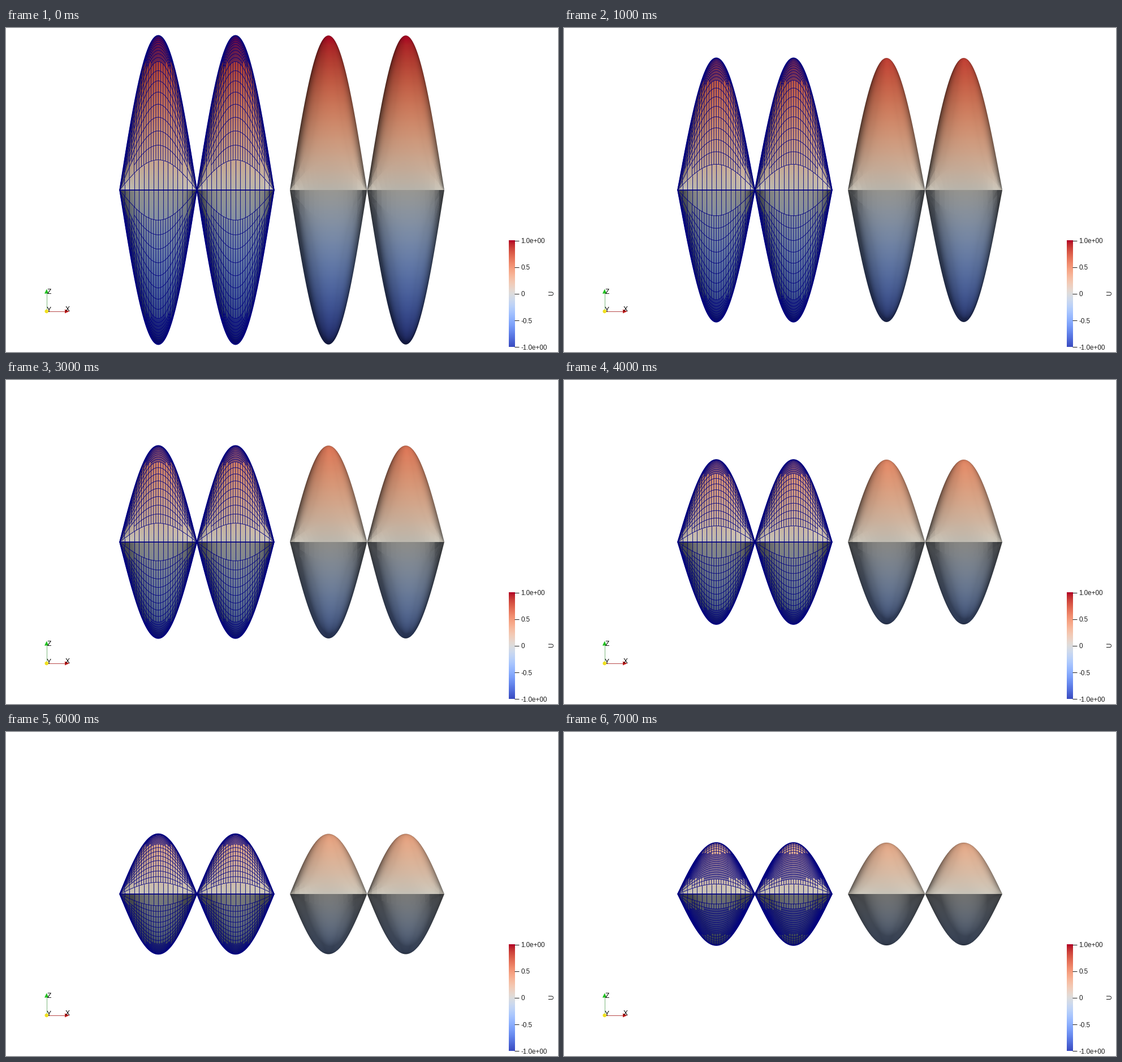
Recreate the animation shown at these times as a matplotlib script. Size 976 px wide and 574 px high, loop 8000 ms.

```python
import numpy as np
import matplotlib.pyplot as plt
from matplotlib.animation import FuncAnimation
from matplotlib.collections import LineCollection
from matplotlib.patches import Circle, Polygon

W, H, DPI = 976, 574, 64
PX = 72 / DPI                    # points per pixel
MID, AMP, DECAY = 287.0, 273.7, 0.8545
LOBE = 136.5
LEFT, RIGHT = 201.0, 502.0
COARSE = 0.15                    # below this relative height the mesh stays coarse
NAVY = (0, 0, 0.5)
INK = "#1c1c1c"
CMAP = plt.get_cmap("coolwarm")

fig = plt.figure(figsize=(W / DPI, H / DPI), dpi=DPI, facecolor="white")
ax = fig.add_axes([0, 0, 1, 1])
ax.axis("off")


def direction(elevation, azimuth):
    e, a = np.radians([elevation, azimuth])
    return np.array([np.cos(e) * np.sin(a), np.cos(e) * np.cos(a), np.sin(e)])


# (direction as x / toward camera / up, intensity, colour)
LIGHTS = [
    (direction(50, 10), 0.75, (1, 0.972, 0.902)),
    (direction(-75, 0), 0.18, (0.909, 0.955, 1)),
    (direction(0, 0), 0.25, (1, 1, 1)),
    (direction(0, 110), 0.21, (1, 1, 1)),
    (direction(0, -110), 0.21, (1, 1, 1)),
]

px, py = np.meshgrid(np.arange(W) + 0.5, np.arange(H) + 0.5)
across = np.where(px < 488, px - LEFT, px - RIGHT) / LOBE
inside = (across >= 0) & (across <= 2)
across = across % 1
height = MID - py
side = np.where(height >= 0, 1.0, -1.0)


def light(u, s, amp):
    """Light on the front face at phase u and relative height s."""
    k = amp * np.pi / LOBE
    n = np.stack([-k * np.cos(np.pi * u) * s,
                  k * np.sin(np.pi * u) * np.sqrt(1 - s ** 2),
                  side], axis=-1)
    n /= np.linalg.norm(n, axis=-1, keepdims=True)
    total = np.zeros(n.shape)
    for d, power, tint in LIGHTS:
        total += np.clip(n @ d, 0, None)[..., None] * power * np.array(tint)
    return np.clip(total, 0, 1)


def facets(u, s):
    """Snap points in coarse cells to the centre of their triangle."""
    a, b = u * 16, np.arcsin(s) / np.pi * 16
    i, j = np.floor(a), np.floor(b)
    third = np.where(a - i + b - j > 1, 2 / 3, 1 / 3)
    rel = np.sin(np.pi * (i + 0.5) / 16) * np.sin(np.pi * (j + 0.5) / 16)
    v = np.minimum((j + third) / 16, 0.5)
    return rel < COARSE, (i + third) / 16, np.sin(np.pi * v)


def surface(amp, faceted):
    top = np.maximum(amp * np.sin(np.pi * across), 1e-6)
    s = np.clip(np.abs(height) / top, 0, 1)
    shade = light(across, s, amp)
    if faceted:
        coarse, u2, s2 = facets(across, s)
        flat = 0.45 * shade + 0.55 * light(u2, s2, amp)
        shade = np.where(coarse[..., None], flat, shade)
    rgb = CMAP((height / AMP + 1) / 2)[..., :3] * shade
    slope = amp * np.pi / LOBE * np.cos(np.pi * across)
    cover = np.clip((top - np.abs(height)) / np.hypot(1, slope) + 0.5, 0, 1)
    cover = (cover * inside)[..., None]
    return rgb * cover + (1 - cover)


def mesh(late):
    """Lower and left edges of an adaptively split grid, in units of pi."""
    edges = []

    def split(i, j, n):
        rel = np.sin(np.pi * (i + 0.5) / n) * np.sin(np.pi * (j + 0.5) / n)
        if n == 16:
            fine = rel > COARSE
        else:
            fine = n == 32 and (0.3 < rel < 0.79 if late else rel > 0.815)
        if fine:
            for di in (0, 1):
                for dj in (0, 1):
                    split(2 * i + di, 2 * j + dj, 2 * n)
        else:
            edges.append([(i + 1, j), (i, j), (i, j + 1)])
            edges[-1] = np.array(edges[-1]) / n

    for i in range(16):
        for j in range(8):
            split(i, j, 16)
    return np.array(edges)


MESHES = [mesh(False), mesh(True)]


def wires(grid, amp):
    u, v = grid[..., 0], grid[..., 1]
    z = amp * np.sin(np.pi * u) * np.sin(np.pi * v)
    return np.concatenate([np.stack([LEFT + (n + u) * LOBE, MID - g * z], axis=-1)
                           for n in (0, 1) for g in (1, -1)])


def rims(amp):
    u = np.linspace(0, 2, 241)
    z = amp * np.abs(np.sin(np.pi * u))
    return [np.column_stack([LEFT + u * LOBE, MID - g * z]) for g in (1, -1, 0)]


def label(x, y, text, size=11.6, color=INK, **kw):
    ax.text(x, y, text, fontsize=size * PX, family="Liberation Sans",
            color=color, va="center_baseline", **kw)


def line(xs, ys, color, width=1):
    ax.plot(xs, ys, color=color, lw=width * PX, solid_capstyle="butt", zorder=4)


def color_bar():
    ramp = np.linspace(1, 0, 189)[:, None]
    ax.imshow(CMAP(ramp), extent=(889, 900, 565.5, 376.5), aspect="auto",
              interpolation="nearest", zorder=3)
    names = ["1.0e+00", "0.5", "0", "-0.5", "-1.0e+00"]
    for n, name in enumerate(names):
        y = 376.5 + 47.2 * n
        line([898.5, 907], [y, y], INK)
        label(910.5, y, name)
    label(965, 470, "U", rotation=90, ha="center")


def axes_marker():
    line([72, 72], [502, 470], "#7fb87f")
    line([72, 105], [502, 502], "#b84a4a")
    green = [(68, 470.5), (75.5, 470.5), (71.8, 462.5)]
    red = [(104, 498.5), (104, 505.5), (112, 502)]
    for pts, color in ((green, "#22c022"), (red, "#c01c1c")):
        ax.add_patch(Polygon(pts, fc=color, ec="none", zorder=5))
    ax.add_patch(Circle((71.8, 502), 3.3, fc="#f0e020", ec="none", zorder=6))
    for x, y, name in ((76.5, 466.5, "Z"), (76, 498.5, "Y"), (109, 498, "X")):
        label(x, y, name, 12, "black", ha="center", zorder=7)


body = ax.imshow(np.ones((H, W, 3)), extent=(0, W, H, 0), aspect="auto",
                 interpolation="nearest", zorder=1)
net = ax.add_collection(LineCollection([], colors=[NAVY], linewidths=0.85 * PX, zorder=2))
rim = ax.add_collection(LineCollection([], colors=[NAVY], linewidths=1.5 * PX, zorder=2))
color_bar()
axes_marker()
ax.set(xlim=(0, W), ylim=(H, 0))


def draw(step):
    amp = AMP * DECAY ** step
    late = step >= 7             # the mesh is rebuilt for the last step
    body.set_data(surface(amp, not late))
    net.set_segments(wires(MESHES[late], amp))
    rim.set_segments(rims(amp))
    return body, net, rim


anim = FuncAnimation(fig, draw, frames=8, interval=1000, repeat=True, repeat_delay=0)
plt.show()
```
